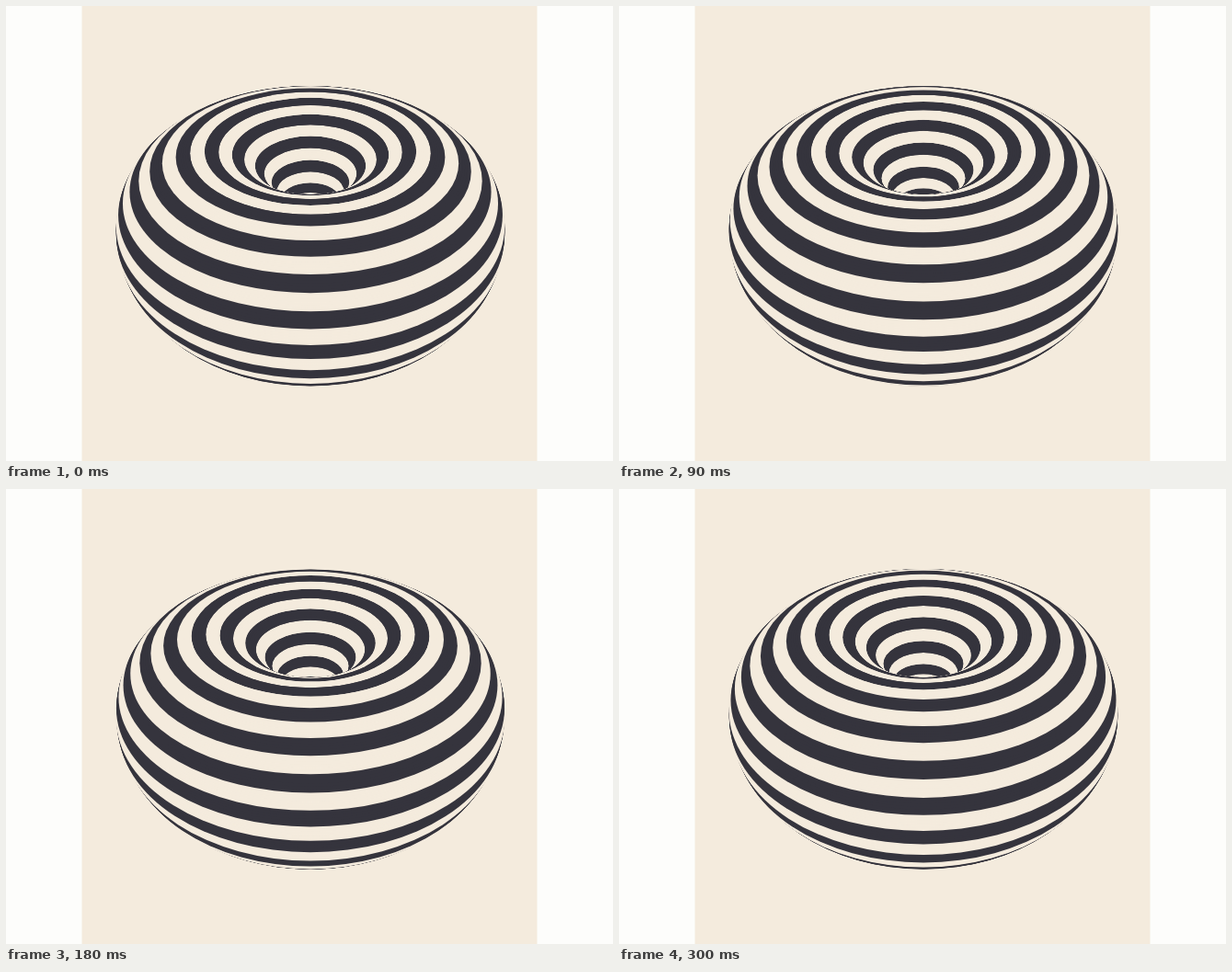
These frames come from a looping animation (660 px wide and 495 px high, 0.33 s). An HTML page with a canvas:

```html
<!DOCTYPE html>
<html lang="en">
<head>
<meta charset="utf-8">
<title>Striped torus</title>
<style>
  html, body { margin: 0; width: 100%; height: 100%; overflow: hidden; background: #fdfdfb; }
  canvas { display: block; }
</style>
</head>
<body>
<canvas id="stage" width="660" height="495"></canvas>
<script>
const ctx = document.getElementById('stage').getContext('2d');
const CREAM = '#f4ebdd', DARK = '#35343d';

// Torus and pinhole camera, in pixels
const MAJOR = 114.5, MINOR = 83, LIFT = 26.7;
const CX = 331, CY = 247.5, FOCAL = 480;
const RAD = Math.PI / 180, TILT = 41.05 * RAD;
const SIN = Math.sin(TILT), COS = Math.cos(TILT);

// Stripes, in degrees around the tube
const PERIOD = 18, SLICES = 12, FIRST_EDGE = 9.6 - 4 * PERIOD;
const STEP_MS = 30, STEPS = 11;

// Perspective image of the horizontal circle at tube angle v: always an ellipse
function ringPath(v) {
  const radius = MAJOR + MINOR * Math.cos(v * RAD);
  const height = MINOR * Math.sin(v * RAD);
  const depth = FOCAL - height * SIN;
  const rise = height * COS + LIFT;
  const reach = radius * COS;
  const screenY = side => CY - FOCAL * (rise + side * radius * SIN) / (depth + side * reach);
  const top = screenY(1), bottom = screenY(-1);
  const halfWidth = FOCAL * radius / Math.sqrt(depth * depth - reach * reach);
  ctx.beginPath();
  ctx.ellipse(CX, (top + bottom) / 2, halfWidth, Math.abs(bottom - top) / 2, 0, 0, 2 * Math.PI);
}

function draw(step) {
  ctx.fillStyle = '#fdfdfb';
  ctx.fillRect(0, 0, 660, 495);
  ctx.fillStyle = CREAM;
  ctx.fillRect(82.5, 0, 495, 495);

  // Stack discs up the outside, then nest them down into the hole
  const start = FIRST_EDGE + PERIOD * step / STEPS;
  ctx.save();
  for (let i = 0; ; i++) {
    const v = start + i * PERIOD / SLICES;
    if (v > 210) break;
    ringPath(v);
    if (v > 90) ctx.clip();
    ctx.fillStyle = i % SLICES < SLICES / 2 ? DARK : CREAM;
    ctx.fill();
  }
  ctx.restore();
}

let shown = -1;
function tick() {
  const step = Math.floor(performance.now() / STEP_MS) % STEPS;
  if (step !== shown) draw(shown = step);
  requestAnimationFrame(tick);
}
tick();
</script>
</body>
</html>
```
